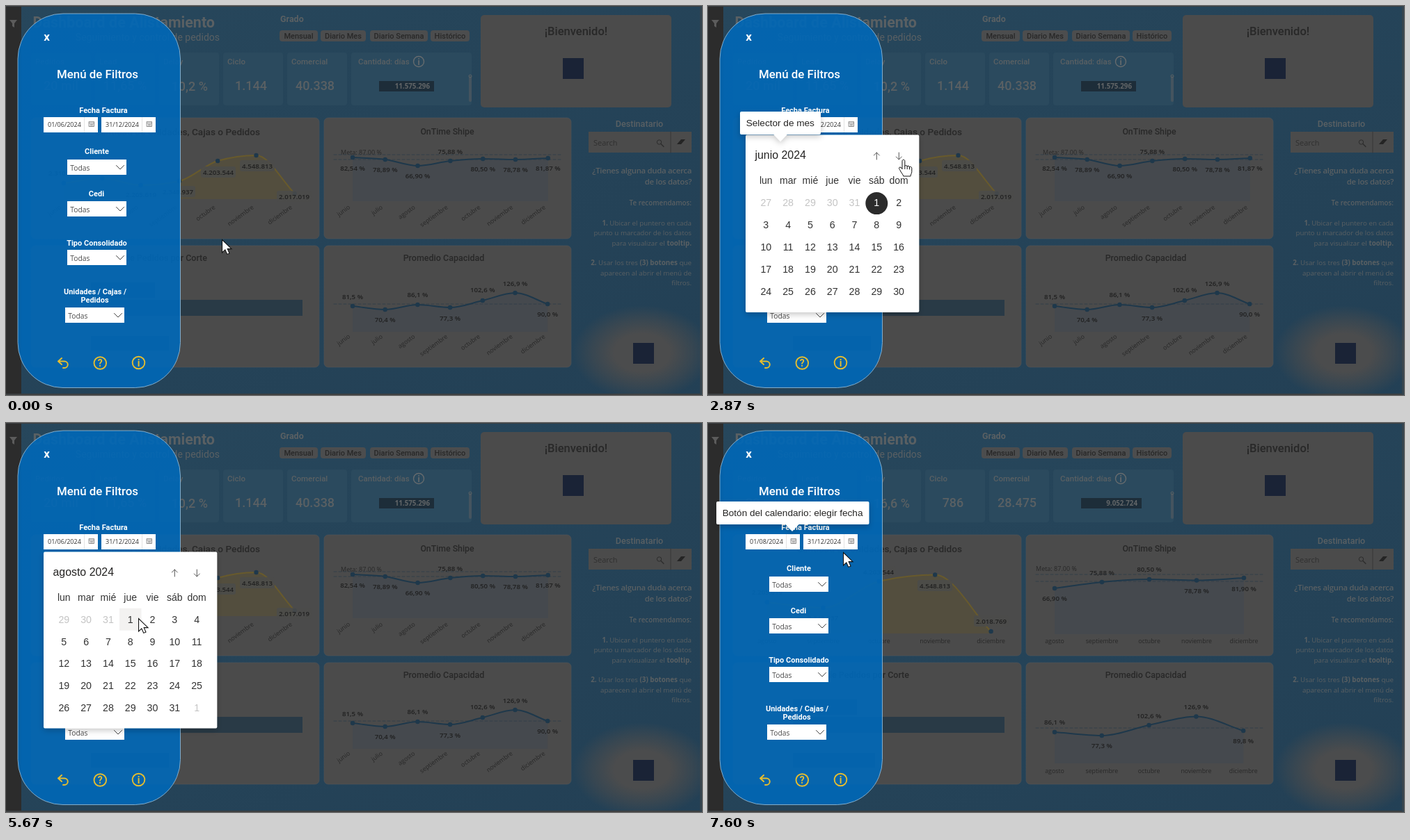
Recreate the animation shown at these times as an HTML page. Size 1000 px wide and 560 px high, loop 8 s.

```html
<!DOCTYPE html>
<html lang="es">
<head>
<meta charset="utf-8">
<title>Menú de Filtros</title>
<style>
  html, body { margin: 0; width: 100%; height: 100%; overflow: hidden; background: #26455a; }
  svg { display: block; width: 100%; height: 100%; font-family: Roboto, sans-serif; }
  .open { font-family: "Open Sans", sans-serif; }
  .arial { font-family: "Liberation Sans", Arial, sans-serif; }
  .mid { text-anchor: middle; }
  .end { text-anchor: end; }
  .m { font-weight: 500; }
  .s { font-weight: 600; }
  .b { font-weight: 700; }
  .line { fill: none; stroke-linecap: round; stroke-linejoin: round; }
</style>
</head>
<body>
<svg id="stage" viewBox="0 0 1000 560" xmlns="http://www.w3.org/2000/svg"></svg>
<script>
const LOOP = 8000, STEP = 200 / 3;
const PANEL = '#4b4b4b', INK = '#282828', PALE = '#5a6063', NAVY = '#1e384b', BAR = '#293a46', LOGO = '#1a2336';
const GOLD = { line: '#685a2c', area: '#57503a' };
const MONTHS = ['junio', 'julio', 'agosto', 'septiembre', 'octubre', 'noviembre', 'diciembre'];

const text = (x, y, s, size, fill, cls = '', extra = '') =>
  `<text x="${x}" y="${y}" font-size="${size}" fill="${fill}" class="${cls}" ${extra}>${s}</text>`;
const rect = (x1, y1, x2, y2, fill, r = 0, extra = '') =>
  `<rect x="${x1}" y="${y1}" width="${x2 - x1}" height="${y2 - y1}" rx="${r}" fill="${fill}" ${extra}/>`;
const circle = (x, y, r, fill, extra = '') => `<circle cx="${x}" cy="${y}" r="${r}" fill="${fill}" ${extra}/>`;
const path = (d, stroke, w = 1, extra = '') =>
  `<path class="line" d="${d}" stroke="${stroke}" stroke-width="${w}" ${extra}/>`;
const group = (id, body = '') => `<g id="${id}">${body}</g>`;

// Monotone cubic through the points
function curve(xs, ys) {
  const n = xs.length, slope = i => (ys[i + 1] - ys[i]) / (xs[i + 1] - xs[i]);
  const tan = xs.map((_, i) => {
    if (i === 0) return slope(0);
    if (i === n - 1) return slope(n - 2);
    const a = slope(i - 1), b = slope(i);
    return a * b <= 0 ? 0 : Math.sign(a) * Math.min(Math.abs(a), Math.abs(b), Math.abs(a + b) / 4) * 2;
  });
  let d = `M${xs[0]} ${ys[0]}`;
  for (let i = 1; i < n; i++) {
    const h = (xs[i] - xs[i - 1]) / 3;
    d += `C${xs[i - 1] + h} ${ys[i - 1] + tan[i - 1] * h} ${xs[i] - h} ${ys[i] - tan[i] * h} ${xs[i]} ${ys[i]}`;
  }
  return d;
}

function chart({ x0, dx, ys, base, tick, labels, labelY, dashes = [], line = NAVY, area = '#444950', dots = NAVY, boxed }) {
  const n = ys.length, xs = ys.map((_, i) => x0 + dx * i), d = curve(xs, ys);
  let out = `<path d="${d}L${xs[n - 1]} ${base}L${x0} ${base}Z" fill="${area}" opacity=".7"/>`;
  dashes.forEach(y => out += path(`M${x0 - 27} ${y}H797`, '#333f48', 1, 'stroke-dasharray="4 3"'));
  out += path(d, line, 2);
  xs.forEach((x, i) => {
    out += circle(x, ys[i], 3.2, dots);
    const y = labelY[i], lx = boxed ? boxed[i] : x;
    if (boxed) out += rect(lx - 25, y - 8, lx + 25, y + 8, '#4c4c4a', 3, 'opacity=".85"');
    out += text(lx, y + 3.5, labels[i], 9.7, '#202020', 'open s mid');
    const name = MONTHS[7 - n + i];
    out += n > 5
      ? text(x - 3, tick, name, 8.8, INK, 'open end', `transform="rotate(-36 ${x - 3} ${tick})"`)
      : text(x, tick, name, 8.8, INK, 'open mid');
  });
  return out;
}
const pct = s => s.split(' ').map(v => v + ' %');

function kpis(delay, cycle, trade, total, barEnd) {
  return text(290, 122, delay, 18, PALE, 'm end') + text(352, 121, cycle, 18, PALE, 'm mid') +
    text(444, 121, trade, 18, PALE, 'm mid') + rect(536, 108, barEnd, 123, '#1d2d39') +
    text(barEnd - 6, 119, total, 9.8, '#626668', 'open b end');
}

const before = () => kpis('10,2 %', '1.144', '40.338', '11.575.296', 615) +
  chart({ x0: 83, dx: 55.3, ys: [255, 248, 258, 252, 223, 215, 270], base: 278, tick: 291,
    labels: ['2.310.284', '2.482.107', '2.205.619', '2.348.937', '4.203.544', '4.548.813', '2.017.019'],
    labelY: [240, 233, 271, 267, 239, 230, 274], boxed: [83, 138, 194, 247, 305, 361, 414], ...GOLD }) +
  text(481, 214, 'Meta: 87.00 %', 9, INK, 'open') +
  chart({ x0: 498, dx: 46.8, ys: [218, 221, 230, 223, 220, 221, 219], base: 281, tick: 291, dashes: [214, 221],
    labels: pct('82,54 78,89 66,90 75,88 80,50 78,78 81,87'), labelY: [233, 235, 244, 209, 234, 235, 233] }) +
  chart({ x0: 498, dx: 46.7, ys: [432, 437, 430, 434, 424, 413, 429], base: 469, tick: 477, dashes: [429],
    labels: pct('81,5 70,4 86,1 77,3 102,6 126,9 90,0'), labelY: [418, 451, 415, 449, 408, 399, 443] }) +
  rect(122, 475, 234, 496, BAR);

const after = () => kpis('16,6 %', '786', '28.475', '9.052.724', 623) +
  chart({ x0: 85, dx: 80.4, ys: [258, 266, 228, 218.5, 300], base: 303, tick: 317,
    labels: ['2.205.619', '2.348.937', '4.203.544', '4.548.813', '2.018.769'],
    labelY: [243, 280, 214, 234, 285], boxed: [85, 165, 245, 326, 407], ...GOLD }) +
  text(471, 213, 'Meta: 87.00 %', 9, INK, 'open') +
  chart({ x0: 498, dx: 68, ys: [238, 229, 225, 226.5, 223], base: 304, tick: 317, dashes: [218, 228],
    labels: pct('66,90 75,88 80,50 78,78 81,90'), labelY: [252, 215, 210, 241, 238] }) +
  chart({ x0: 498, dx: 67.8, ys: [445, 450, 435, 422.5, 443], base: 490, tick: 504, dashes: [439],
    labels: pct('86,1 77,3 102,6 126,9 89,8'), labelY: [430, 464, 421, 408, 457] }) +
  rect(122, 475, 240, 496, BAR);

function backdrop() {
  let out = rect(0, 0, 1000, 560, 'url(#page)') + rect(0, 0, 22, 560, '#2c2c2c') +
    rect(0, 0, 1000, 1, '#3c3f41') + rect(0, 558, 1000, 560, '#3c3f41') + rect(997, 0, 1000, 560, '#35444e') +
    '<path d="M5 20h11l-4 5v6l-3-2v-4z" fill="#5c5c5c"/>' +
    text(300, 31, 'Dashboard de Alistamiento', 21.5, PALE, 'b end') +
    text(307, 50, 'Seguimiento y control de pedidos', 14, PALE, 'end') +
    text(394, 23, 'Grado', 12.5, PALE, 'b');
  [['Mensual', 393, 448], ['Diario Mes', 452, 517], ['Diario Semana', 523, 606], ['Histórico', 610, 666]]
    .forEach(([s, a, b]) => out += rect(a, 35, b, 51, '#4c4d4e', 4) + text((a + b) / 2, 47, s, 11, INK, 'm mid'));
  [['Pedidos', 36, 122], ['Lead', 128, 214], ['Delay', 220, 306], ['Ciclo', 312, 398], ['Comercial', 404, 490], ['Cantidad: días', 496, 669]]
    .forEach(([s, a, b], i) => out += rect(a, 67, b, 143, '#2b4a5e', 4) +
      text(a + (i === 5 ? 10 : 6), 84, s, 11.5, PALE, 'm'));
  out += text(79, 121, '20 mil', 18, PALE, 'm mid') + text(171, 121, '11,65 %', 18, PALE, 'm mid') +
    circle(593, 80, 7.5, 'none', 'stroke="#666b6e" stroke-width="1.4"') + text(593, 84.5, 'i', 12, '#666b6e', 'b mid') +
    rect(665, 101, 669, 138, '#45545f', 2) + circle(667, 101, 2, 'none', 'stroke="#5d6265"') +
    rect(682, 13, 956, 146, PANEL, 5) + text(819, 42, '¡Bienvenido!', 16.5, INK, 'm mid') + rect(800, 75, 830, 105, LOGO);
  [[36, 161, 450, 335], [457, 161, 812, 335], [36, 345, 450, 520], [457, 345, 812, 520]]
    .forEach(p => out += rect(...p, PANEL, 6, 'stroke="#53575a" stroke-width=".6"'));
  out += text(365, 186, 'Cantidad de Unidades, Cajas o Pedidos', 13.6, INK, 'm end') +
    text(634, 185, 'OnTime Shipe', 12.3, INK, 'm mid') +
    text(289, 367, 'Cantidad de Pedidos por Corte', 12.5, INK, 'm end') +
    text(629, 367, 'Promedio Capacidad', 12.5, INK, 'm mid') +
    rect(122, 398, 214, 420, BAR) + rect(122, 423, 426, 446, BAR) +
    text(910, 174, 'Destinatario', 12.6, PALE, 'm mid') +
    rect(837, 181, 985, 211, PANEL) + path('M955 181V211', '#383838') +
    text(844, 201, 'Search', 11, '#303030', 'open') +
    circle(938.5, 196, 3.2, 'none', 'stroke="#2c2c2c"') + path('M941 198.500l4 4', '#2c2c2c', 1.2) +
    '<path d="M964 199l6-7h6l-6 7z" fill="#242424"/>';
  const bold = s => `<tspan font-weight="700">${s}</tspan>`;
  [['¿Tienes alguna duda acerca', 241, 11.4], ['de los datos?', 257, 11.4]]
    .forEach(([s, y, z]) => out += text(985, y, s, z, PALE, 'open s end', 'letter-spacing="-.3"'));
  out += text(985, 287, 'Te recomendamos:', 9.8, PALE, 'open s end');
  [[bold('1.') + ' Ubicar el puntero en cada', 316], ['punto u marcador de los datos', 330],
    ['para visualizar el ' + bold('tooltip.'), 345], [bold('2.') + ' Usar los tres ' + bold('(3) botones') + ' que', 373],
    ['aparecen al abrir el menú de', 388], ['filtros.', 402]]
    .forEach(([s, y]) => out += text(985, y, s, 9.8, PALE, 'open end'));
  return out + '<ellipse cx="914" cy="499" rx="100" ry="68" fill="url(#glow)"/>' + rect(901, 485, 931, 515, LOGO);
}

function dateBox(x, id, value) {
  const ix = x + 65.5;
  return rect(x, 160, x + 78, 182, '#fff') + text(x + 6, 174, value, 9, '#333', 'open', `id="${id}"`) +
    path(`M${x + 58.5} 160.500V181.500`, '#e3e3e3') +
    path(`M${ix} 166.500h7v7h-7zM${ix} 168.500h7M${ix + 1.5} 170.500h4M${ix + 1.5} 172h4`, '#777', .8);
}

function menu() {
  const gold = '#e4bd30';
  let out = rect(17, 11, 250.5, 549.5, '#0068b7', 65, 'fill-opacity=".91" stroke="#8fb6d2" stroke-width=".9"') +
    text(58.5, 50, 'x', 17, '#fff', 'b mid') + text(131.5, 104, 'Menú de Filtros', 16.9, '#fff', 'm mid') +
    dateBox(54, 'from', '01/06/2024') + dateBox(137, 'to', '31/12/2024');
  [['Fecha Factura', 140, 154], ['Cliente', 130.5, 213], ['Cedi', 130, 274], ['Tipo Consolidado', 130.5, 345],
    ['Unidades / Cajas /', 128, 415], ['Pedidos', 127.5, 427]]
    .forEach(([s, x, y]) => out += text(x, y, s, 11, '#fff', 'b mid'));
  [[88, 221], [88, 281], [88, 351], [85, 434]].forEach(([x, y]) => out +=
    rect(x, y, x + 85, y + 22, '#fff') + text(x + 4.2, y + 16, 'Todas', 10.3, '#4a4a4a', 'open') +
    path(`M${x + 70.5} ${y + 8.5}l5.500 5.500 5.500-5.500`, '#444'));
  return out + path('M80 507l-5 4.500 5 4.500M76 511.500h8a4.700 4.700 0 0 1 0 9.500h-2', gold, 2) +
    circle(135.3, 514, 8.8, 'none', `stroke="${gold}" stroke-width="1.9"`) + text(135.3, 519, '?', 14, gold, 'b mid') +
    circle(190.5, 513.5, 8.8, 'none', `stroke="${gold}" stroke-width="1.9"`) + text(190.5, 518.5, 'i', 14, gold, 'b mid');
}

// Calendar: month index 5 = June 2024
function calendar(month, hover) {
  const june = month === 5, top = june ? 283.3 : 282.7, pitch = 31.8;
  const lead = (new Date(2024, month, 1).getDay() + 6) % 7;
  let out = rect(54, 185.5, 303.3, june ? 441 : 439.5, '#fff', 2, 'filter="url(#shadow)"') +
    text(67.5, 220, MONTHS[month - 5] + ' 2024', 15.9, '#252423', 'arial') +
    path('M242.300 221V211M238.300 215l4-4 4 4M274.300 211V221M270.300 217l4 4 4-4', '#555');
  ['lun', 'mar', 'mié', 'jue', 'vie', 'sáb', 'dom']
    .forEach((s, i) => out += text(83.3 + i * pitch, 256, s, 14, '#333', 'arial mid'));
  for (let i = 0; i < 35; i++) {
    const day = new Date(2024, month, 1 - lead + i), x = 83.3 + (i % 7) * pitch, y = top + Math.floor(i / 7) * pitch;
    const inside = day.getMonth() === month, picked = june && inside && day.getDate() === 1;
    if (i === hover) out += rect(x - 15.8, y - 16, x + 15.8, y + 16, '#f3f2f1');
    if (picked) out += circle(x, y + .8, 16, '#2b2b2b');
    out += text(x, y + 5, day.getDate(), 14.2, picked ? '#fff' : inside ? '#333' : '#c4c4c4', 'arial mid');
  }
  return out;
}

const tip = (id, x1, x2, y, beak, s) => group(id,
  `<g filter="url(#shadow)">${rect(x1, y, x2, y + 33, '#fff', 2)}<path d="M${beak - 10} ${y + 32.5}h20l-10 10.500z" fill="#fff"/></g>` +
  text(x1 + 8.7, y + 20.5, s, 13.6, '#252423', 'arial'));

const ARROW = '<path transform="scale(1.08)" d="M.5.500V17.500l4-3.700 2.700 6 3-1.300-2.600-5.900h5.400z" fill="#fff" stroke="#111"/>';
const HAND = '<path d="M-2 2.200C-2-.300 1.800-.300 1.800 2.200V9.500C2.300 8 5 8.200 5.200 10c.600-1.300 3.100-1 3.300.900.700-1 3.200-.700 3.300 1.500v5.200c0 2.200-1.600 3.700-1.800 6.400H-.200c-.400-2.300-3.300-5.200-4.700-8.200-.800-1.600-1.700-2.500-1.600-3.500.2-1.700 2.500-1.500 3.500-.100l1 1.500z" fill="#fff" stroke="#111"/>' +
  path('M1.800 9.500v4M5.200 10v3.700M8.500 11v3', '#111');

document.getElementById('stage').innerHTML = `<defs>
  <linearGradient id="page" x2="1" y2="1"><stop stop-color="#27475c"/><stop offset="1" stop-color="#234055"/></linearGradient>
  <radialGradient id="glow"><stop offset=".4" stop-color="#4b4c4d"/><stop offset=".72" stop-color="#4b4c4d" stop-opacity=".5"/><stop offset="1" stop-color="#4b4c4d" stop-opacity="0"/></radialGradient>
  <filter id="shadow" x="-20%" y="-30%" width="140%" height="180%"><feDropShadow dx="0" dy="3" stdDeviation="4" flood-opacity=".22"/></filter>
  </defs>` + backdrop() + group('before', before()) + group('after', after()) + menu() + group('cal') +
  tip('tipButton', 12, 231.5, 113, 121, 'Botón del calendario: elegir fecha') +
  tip('tipMonth', 46, 162, 152, 104, 'Selector de mes') +
  tip('tipNext', 223, 325, 152, 274, 'Mes siguiente') +
  group('arrow', ARROW) + group('hand', HAND);

const el = id => document.getElementById(id);
const show = (id, on) => el(id).setAttribute('display', on ? 'inline' : 'none');

// Pointer track: time, x, y
const TRACK = [
  [0, 310, 336], [400, 114, 168], [667, 114, 168], [933, 130, 175], [1133, 130, 175], [1267, 131, 172],
  [1533, 131, 172], [2000, 112, 208], [2333, 150, 222], [2800, 281, 221], [3200, 281, 221], [3800, 204, 393],
  [4067, 222, 410], [4400, 284, 418], [4933, 189, 280], [5000, 186, 274], [5067, 190, 276], [5600, 190, 276],
  [5667, 190, 281], [5800, 190, 281], [6467, 400, 327], [6600, 324, 295], [7333, 237, 190], [7467, 214, 179],
  [7600, 194, 186], [LOOP, 194, 186]];

function pointer(t) {
  const i = Math.max(1, TRACK.findIndex(k => k[0] >= t));
  const [ta, xa, ya] = TRACK[i - 1], [tb, xb, yb] = TRACK[i];
  const u = (t - ta) / (tb - ta), e = u * u * (3 - 2 * u);
  return [Math.round(xa + (xb - xa) * e), Math.round(ya + (yb - ya) * e)];
}

function showTip(id, t, spans) {
  const span = spans.find(([a, b]) => t >= a && t < b);
  show(id, span);
  if (!span) return;
  const p = Math.min(1, (t - span[0] + STEP) / (4 * STEP));
  el(id).setAttribute('opacity', p);
  el(id).setAttribute('transform', `translate(0 ${-11 * (1 - p) ** 2})`);
}

let calKey = '';
function render(ms) {
  const t = Math.floor((ms % LOOP + 4) / STEP) * STEP;
  const [x, y] = pointer(t);
  const open = t > 1500 && t < 5700, hand = t > 300 && t < 5640;
  show('before', t < 6100);
  show('after', t >= 6100);
  el('from').textContent = t < 5700 ? '01/06/2024' : '01/08/2024';

  show('cal', open);
  if (open) {
    const month = t < 2920 ? 5 : t < 3120 ? 6 : 7;
    const col = Math.floor((x - 67.4) / 31.8), row = Math.floor((y - 267) / 31.8);
    const hover = col >= 0 && col < 7 && row >= 0 && row < 5 ? row * 7 + col : -1;
    const key = month + ':' + hover;
    if (key !== calKey) el('cal').innerHTML = calendar(month, hover);
    calKey = key;
  }

  showTip('tipButton', t, [[730, 1500], [5790, LOOP]]);
  showTip('tipMonth', t, [[2390, 2920]]);
  showTip('tipNext', t, [[2990, 3390]]);

  show('arrow', !hand);
  show('hand', hand);
  el(hand ? 'hand' : 'arrow').setAttribute('transform', `translate(${x} ${y})`);
}

const start = performance.now();
function tick() {
  render(performance.now() - start);
  requestAnimationFrame(tick);
}
tick();
</script>
</body>
</html>
```
